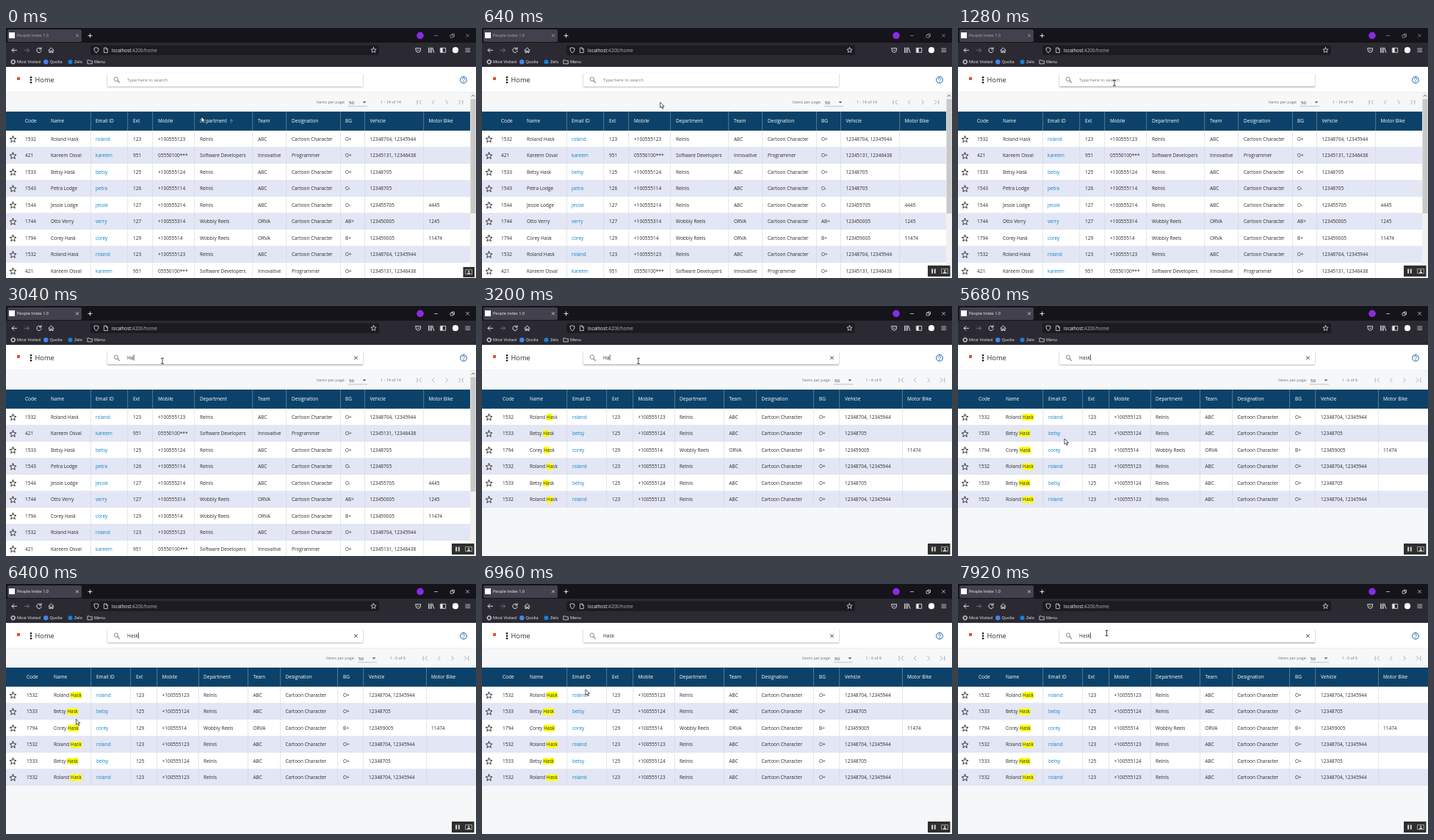
An HTML page for the animation above (8 s loop, 640 by 341 pixels).

```html
<!DOCTYPE html>
<html lang="en">
<head>
<meta charset="utf-8">
<title>People Index</title>
<style>
  html, body { margin: 0; width: 100%; height: 100%; overflow: hidden; background: #f5f7f9; }
  svg { display: block; width: 640px; height: 341px; }
  text { font-family: "Open Sans", sans-serif; font-size: 6.5px; fill: #2c2c2c; white-space: pre; }
  .ui { font-size: 5.6px; fill: #f4f4f6; }
  .url { font-size: 6.3px; }
  .dim { fill: #b4b4bc; }
  .home { font-size: 9.2px; }
  .hint { font-size: 6px; fill: #777; }
  .pager { font-size: 5.4px; fill: #737679; }
  .size { font-size: 6px; }
  .head { fill: #fff; }
  .link { fill: #0a84c6; }
  .line { fill: none; stroke-linecap: round; stroke-linejoin: round; }
</style>
</head>
<body>
<svg id="stage" viewBox="0 0 640 341" xmlns="http://www.w3.org/2000/svg">
  <defs>
    <filter id="shadow" x="-5%" y="-50%" width="110%" height="220%">
      <feDropShadow dx="0" dy="1" stdDeviation="1.2" flood-opacity=".34"/>
    </filter>
  </defs>
</svg>
<script>
const LOOP = 8000, STEP = 80;
const NS = 'http://www.w3.org/2000/svg';
const stage = document.getElementById('stage');

function add(parent, tag, attrs = {}, content) {
  const node = document.createElementNS(NS, tag);
  for (const key in attrs) node.setAttribute(key, attrs[key]);
  if (content !== undefined) node.textContent = content;
  return parent.appendChild(node);
}
const group = (parent = stage) => add(parent, 'g');
const rect = (p, x, y, width, height, fill, rx = 0) => add(p, 'rect', { x, y, width, height, fill, rx });
const dot = (p, cx, cy, r, fill) => add(p, 'circle', { cx, cy, r, fill });
const text = (p, x, y, content, cls = '') => add(p, 'text', { x, y, class: cls }, content);
const line = (p, d, stroke, width = 0.9) => add(p, 'path', { d, stroke, 'stroke-width': width, class: 'line' });
const show = (node, on) => node.setAttribute('visibility', on ? 'inherit' : 'hidden');

function star(p, cx, cy, r, color, width) {
  const points = Array.from({ length: 10 }, (_, i) => {
    const a = i * Math.PI / 5 - Math.PI / 2, q = i % 2 ? r * 0.45 : r;
    return `${(cx + q * Math.cos(a)).toFixed(2)} ${(cy + q * Math.sin(a)).toFixed(2)}`;
  });
  line(p, `M${points.join('L')}Z`, color, width);
}

function drawBrowser() {
  const g = group(), ink = '#f4f4f6', grey = '#777680';
  rect(g, 0, 0, 640, 21, '#15141a');
  rect(g, 0, 20, 640, 33, '#2b2a33');
  rect(g, 2, 2, 101, 17, '#42414d', 2);
  rect(g, 4, 6, 8, 8, '#fff');
  line(g, 'M112 10.5h5m-2.5-2.5v5', ink);
  dot(g, 564, 10.3, 4.8, '#8a2be2');
  const titleBar = group(g);
  text(titleBar, 15, 12.4, 'People Index 1.0', 'ui');
  line(titleBar, 'M95.3 8.6l3.4 3.4m0-3.4l-3.4 3.4', ink, 0.7);
  line(titleBar, 'M583.5 10.5h4M605.5 9.5h3.5v3.5h-3.5zM607 9.5v-1.5h3.5v3.5h-1.5M626.5 8.3l4 4m0-4l-4 4', ink, 0.7);

  line(g, 'M14.5 30.3h-6.5m2.8-2.8l-2.8 2.8 2.8 2.8', ink);
  line(g, 'M25 30.3h6.5m-2.8-2.8l2.8 2.8-2.8 2.8', grey);
  line(g, 'M47.5 28.2a3.2 3.2 0 1 0 .7 2.8M48 26.5v2.5h-2.5', ink);
  line(g, 'M58 30.3l3.5-3.3 3.5 3.3M59 30v3.5h1.7v-2.2h1.6v2.2h1.7v-3.5', ink);

  rect(g, 115, 23.5, 393, 13.5, '#1c1b22', 2);
  line(g, 'M123 26.8l3 1c0 3-.8 4.6-3 6-2.2-1.4-3-3-3-6z', ink, 0.8);
  line(g, 'M133.8 27h2.7l1.8 1.8v4.8h-4.5zM136.3 27v2h2', ink, 0.7);
  const url = text(g, 144, 32.6, '', 'ui url');
  add(url, 'tspan', {}, 'localhost');
  add(url, 'tspan', { class: 'dim' }, ':4200/home');
  star(g, 500.5, 30.3, 3.8, ink, 0.7);

  line(g, 'M558 27.5h6.5v2.5a3.2 3.2 0 0 1-6.5 0zM559.8 29.5l1.5 1.5 1.5-1.5', ink, 0.8);
  line(g, 'M575.5 27v6.5M577.5 27v6.5M579.5 27v6.5M580.8 27.2l2 6.2', ink, 0.9);
  rect(g, 592, 27.5, 2.6, 5.6, ink);
  line(g, 'M591.7 27.3h7v6h-7z', ink, 0.8);
  dot(g, 612, 30.2, 4.1, '#fff');
  line(g, 'M625.8 28h6M625.8 30.2h6M625.8 32.4h6', ink, 0.7);

  dot(g, 9.7, 46.2, 2.3, 'none').setAttribute('stroke', ink);
  add(g, 'circle', { cx: 9.7, cy: 46.2, r: 3.1, fill: 'none', stroke: ink, 'stroke-width': 0.9, 'stroke-dasharray': '1.2 1.23' });
  text(g, 15, 48.3, 'Most Visited', 'ui');
  dot(g, 54.3, 46.2, 3.2, '#4285f4');
  text(g, 59.5, 48.3, 'Quolia', 'ui');
  dot(g, 87.5, 46.2, 3, '#1683d8');
  text(g, 93, 48.3, 'Zelo', 'ui');
  line(g, 'M111.3 43.8h2.2l.8 1h3v4h-6z', ink, 0.7);
  text(g, 120, 48.3, 'Menu', 'ui');
  return titleBar;
}

function drawPageTop() {
  const g = group();
  rect(g, 0, 53, 640, 34.5, '#fff');
  rect(g, 0, 87.2, 640, 0.6, '#e6e9ec');
  rect(g, 15, 67, 4, 4, '#e8512f');
  for (const y of [67.3, 70.8, 74.3]) dot(g, 34, y, 1.2, '#111');
  text(g, 39.6, 74.2, 'Home', 'home');
  dot(g, 623, 70.8, 4.4, 'none').setAttribute('stroke', '#1565a8');
  line(g, 'M621.5 69.7c0-2.2 3.1-2.2 3.1-.1 0 1.3-1.5 1.2-1.5 2.4M623.1 73.4v.1', '#1565a8', 0.9);
  add(g, 'rect', { x: 138, y: 61.2, width: 348, height: 18.3, rx: 1, fill: '#fff', filter: 'url(#shadow)' });
  const hover = line(g, 'M138.5 80h347', '#b4b4b4', 0.8);
  dot(g, 149.9, 69.8, 2.7, 'none').setAttribute('stroke', '#8b8b8b');
  line(g, 'M152 72l2.6 2.6', '#8b8b8b', 1.2);
  const hint = text(g, 165, 72.7, 'Type here to search', 'hint');
  const value = text(g, 165, 72.8, '');
  const clear = line(g, 'M474.5 68.8l3.9 3.9m0-3.9l-3.9 3.9', '#222', 0.9);
  const caret = rect(g, 165, 66.3, 0.7, 8, '#111');
  return { hover, hint, value, clear, caret };
}

const people = {
  roland: ['1532', 'Roland Hask', 'roland', '123', '+100555123', 'Relnis', 'ABC', 'Cartoon Character', 'O+', '12348704, 12345944', ''],
  kareem: ['421', 'Kareem Osval', 'kareem', '951', '05550100***', 'Software Developers', 'Innovative', 'Programmer', 'O+', '12345131, 12346438', ''],
  betsy: ['1533', 'Betsy Hask', 'betsy', '125', '+100555124', 'Relnis', 'ABC', 'Cartoon Character', 'O+', '12348705', ''],
  petra: ['1543', 'Petra Lodge', 'petra', '126', '+100555114', 'Relnis', 'ABC', 'Cartoon Character', 'O-', '12348705', ''],
  jessie: ['1544', 'Jessie Lodge', 'jessie', '127', '+100555214', 'Relnis', 'ABC', 'Cartoon Character', 'O-', '123455705', '4445'],
  verry: ['1744', 'Otto Verry', 'verry', '127', '+100555314', 'Wobbly Reels', 'ORVA', 'Cartoon Character', 'AB+', '123450005', '1245'],
  corey: ['1794', 'Corey Hask', 'corey', '129', '+10055514', 'Wobbly Reels', 'ORVA', 'Cartoon Character', 'B+', '123459005', '11474']
};
const titles = ['Code', 'Name', 'Email ID', 'Ext', 'Mobile', 'Department', 'Team', 'Designation', 'BG', 'Vehicle', 'Motor Bike'];
const NAME = 1, EMAIL = 2, QUERY = 'Hask';

const layouts = {
  full: {
    width: 632, columns: [26, 61, 122, 173, 207, 264, 343, 389, 462, 495.5, 575.5],
    rules: [115, 165.5, 199.5, 256.5, 335.5, 381.5, 455, 488, 568.5],
    rows: 'roland kareem betsy petra jessie verry corey roland kareem',
    pager: { label: 423, size: 467, range: 510, icons: 563, count: '1 - 14 of 14' }
  },
  found: {
    width: 640, columns: [28, 65, 123, 177, 212.5, 269, 336.5, 380.5, 459, 494, 579],
    rules: [115.5, 169.5, 205.5, 262, 329, 373.5, 451, 486.5, 572],
    rows: 'roland betsy corey roland betsy roland',
    pager: { label: 436, size: 480, range: 522.5, icons: 571, count: '1 - 6 of 6' }
  }
};

function drawPager(g, { label, size, range, icons, count }) {
  text(g, label, 103.3, 'Items per page:', 'pager');
  text(g, size, 103.5, '50', 'size');
  add(g, 'path', { d: `M${size + 18.5} 100.2h5l-2.5 2.6z`, fill: '#666' });
  rect(g, size - 1, 106.6, 26, 0.6, '#999');
  text(g, range, 103.3, count, 'pager');
  const marks = ['M-3 -2.7v5.4M2.5 -2.7l-2.7 2.7 2.7 2.7', 'M1.4 -2.7l-2.7 2.7 2.7 2.7',
    'M-1.4 -2.7l2.7 2.7-2.7 2.7', 'M3 -2.7v5.4M-2.5 -2.7l2.7 2.7-2.7 2.7'];
  marks.forEach((d, i) =>
    line(g, d, '#a9adb0', 1).setAttribute('transform', `translate(${icons + i * 18.6} 101.3)`));
}

function drawTable({ width, columns, rules, rows, pager }) {
  const g = group(), marks = [];
  const names = rows.split(' ');
  drawPager(g, pager);
  rect(g, 0, 114, width, 26, '#0c4269');
  const arrows = titles.map((title, i) => {
    const label = text(g, columns[i], 129.4, title, 'head');
    const x = columns[i] + label.getComputedTextLength() + 6;
    return line(g, `M${x} 129.3v-4.4m-1.7 1.7l1.7-1.7 1.7 1.7`, '#8ea6b8', 0.7);
  });
  names.forEach((name, row) => {
    const top = 140 + row * 22.5, mid = top + 11.7;
    rect(g, 0, top, width, 22.5, row % 2 ? '#e3e6f4' : '#fff');
    rect(g, 0, top + 22.1, width, 0.4, '#dcdfe8');
    star(g, 9.5, mid + 0.3, 4.7, '#222', 0.9);
    people[name].forEach((cell, i) => {
      const mark = i === NAME && cell.endsWith(QUERY) ? rect(g, 0, mid - 4.6, 0, 9, '#ff0') : null;
      const label = text(g, columns[i], mid + 2.2, cell, i === EMAIL ? 'link' : '');
      if (mark) {
        const from = cell.length - QUERY.length;
        mark.setAttribute('x', columns[i] + label.getSubStringLength(0, from));
        marks.push({ mark, label, from });
      }
    });
  });
  const bottom = 140 + names.length * 22.5;
  for (const x of rules) {
    rect(g, x, 114, 0.6, 26, '#7f9bb0');
    rect(g, x, 140, 0.6, bottom - 140, '#d3d6de');
  }
  if (width < 640) {
    rect(g, width, 88, 8, 253, '#f0f0f0');
    rect(g, width + 0.6, 97, 7, 156, '#c9c9c9');
    line(g, 'M634.3 93.2l1.8-1.9 1.8 1.9', '#555', 1);
  }
  const highlight = count => marks.forEach(({ mark, label, from }) =>
    mark.setAttribute('width', count ? label.getSubStringLength(from, count) : 0));
  return { g, arrows, rules: [58, ...rules, width], highlight };
}

function drawRecorder() {
  const small = rect(stage, 622.5, 326, 15.5, 14, '#2f2f2f');
  const wide = group();
  rect(wide, 607, 324, 30.5, 15, '#2f2f2f');
  rect(wide, 612.2, 328.5, 1.9, 6.2, '#ddd');
  rect(wide, 615.8, 328.5, 1.9, 6.2, '#ddd');
  const icon = group();
  line(icon, 'M626 328.6h8.4v6h-8.4z', '#bbb', 0.8);
  dot(icon, 630.2, 330.8, 1.1, '#ddd');
  add(icon, 'path', { d: 'M628 334.6c0-3 4.4-3 4.4 0z', fill: '#ddd' });
  return { small, wide, icon };
}

const titleBar = drawBrowser();
const search = drawPageTop();
const full = drawTable(layouts.full);
const found = drawTable(layouts.found);
const recorder = drawRecorder();

const arrow = add(stage, 'path', {
  d: 'M0 0v7.6l1.8-1.6 1.3 2.9 1.3-.6-1.3-2.8h2.4z', fill: '#fff', stroke: '#111', 'stroke-width': 0.7
});
const beam = line(stage, 'M-1.6 -3.7h1.2l.4.4.4-.4h1.2M0 -3.3v6.6M-1.6 3.7h1.2l.4-.4.4.4h1.2', '#111', 0.8);

// Pointer stops: time, x, y
const path = [
  [0, 266, 121], [240, 266, 121], [480, 257, 114], [880, 221, 82], [1120, 213.5, 75], [1280, 213, 75],
  [5200, 213, 75], [5360, 200, 94], [5680, 145, 181], [5920, 92, 187], [6000, 81, 187], [6160, 89, 190],
  [6320, 89, 190], [6960, 141, 144], [7200, 137, 135], [7680, 202, 68], [7840, 202.5, 67], [LOOP, 202.5, 67]
];
const FOCUS = 1440, FILTER = 3200;
const typing = [[2720, 1], [3040, 2], [3600, 3], [3760, 4]];
const marking = [[FILTER, 2], [3680, 3], [3920, 4]];
const blinks = [FOCUS, 1840, 2240, 4000, 4480, 4880, 5280, 5760, 6160, 6560, 7040, 7440, 7840];

const latest = (table, t) => table.reduce((value, [at, next]) => t >= at ? next : value, 0);

function pointerAt(t) {
  const i = path.findIndex(([at]) => at > t);
  const [t0, x0, y0] = path[i - 1], [t1, x1, y1] = path[i];
  const k = (t - t0) / (t1 - t0);
  return [x0 + (x1 - x0) * k, y0 + (y1 - y0) * k];
}

function render(t) {
  const [x, y] = pointerAt(t);
  const inSearch = x > 138 && x < 486 && y > 61 && y < 80;
  for (const node of [arrow, beam]) node.setAttribute('transform', `translate(${x} ${y})`);
  show(arrow, !inSearch);
  show(beam, inSearch);
  show(search.hover, inSearch);
  titleBar.setAttribute('opacity', t < FOCUS ? 0.6 : 1);

  const typed = QUERY.slice(0, latest(typing, t));
  search.value.textContent = typed;
  show(search.hint, !typed);
  show(search.clear, typed);
  const caretX = 165 + (typed ? search.value.getComputedTextLength() + 0.3 : 0);
  search.caret.setAttribute('x', caretX);
  show(search.caret, blinks.filter(at => t >= at).length % 2);

  const filtered = t >= FILTER;
  show(full.g, !filtered);
  show(found.g, filtered);
  found.highlight(latest(marking, t));
  for (const table of [full, found]) {
    const column = y > 114 && y < 140 ? table.rules.findIndex(edge => x < edge) : -1;
    const active = (table === found) === filtered;
    table.arrows.forEach((node, i) => show(node, active && i === column));
  }

  show(recorder.small, t < STEP);
  show(recorder.wide, t >= STEP);
  recorder.icon.setAttribute('transform', t < STEP ? 'translate(0 1.2)' : '');
}

const start = performance.now();
function tick() {
  const t = (performance.now() - start) % LOOP;
  render(Math.floor(t / STEP) * STEP);
  requestAnimationFrame(tick);
}
tick();
</script>
</body>
</html>
```
